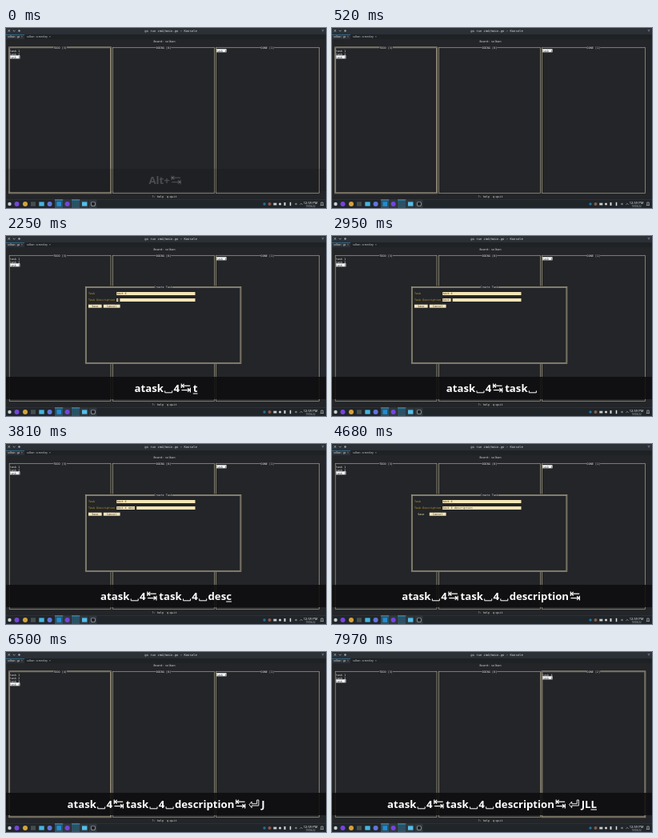
An HTML page with a canvas for the animation above (8 s loop, 400x225 px).

```html
<!DOCTYPE html>
<html lang="en">
<head>
<meta charset="utf-8">
<title>Kanban board in a terminal</title>
<style>
html, body { margin: 0; width: 100%; height: 100%; overflow: hidden; background: #232528; }
canvas { display: block; }
</style>
</head>
<body>
<canvas id="stage" width="400" height="225"></canvas>
<script>
const ctx = document.getElementById('stage').getContext('2d');
const LOOP = 8000, CHAR = 2.08;
const BG = '#232528', LIGHT = '#e2e3e3', CREAM = '#f6e5b5', GOLD = '#c59b25', TAN = '#ada38b';
const MONO = '3.455px "DejaVu Sans Mono", monospace';
const SANS = '"Noto Sans", "Open Sans", sans-serif';
const KEYFONT = 'bold 13.2px "Open Sans", "Noto Sans", sans-serif';

// Key presses: "_" is space, ">" is tab, "<" is enter.
const keys = 'atask_4>task_4_description><JLL';
const times = [523, 950, 1040, 1210, 1300, 1470, 1820, 2080, 2250, 2340, 2430, 2510, 2600,
  3040, 3210, 3470, 3550, 3640, 3730, 3900, 3980, 4070, 4160, 4240, 4330, 4420, 4510,
  4850, 5630, 7630, 7970];
const wide = { '_': 12.6, '>': 16.8, '<': 17 };

const rowY = r => 16 + 4 * r;

function box(x, y, w, h, color) {
  ctx.fillStyle = color;
  ctx.fillRect(x, y, w, h);
}

function dot(x, y, r, color) {
  ctx.fillStyle = color;
  ctx.beginPath();
  ctx.arc(x, y, r, 0, 7);
  ctx.fill();
}

function text(str, x, y, color = LIGHT, font = MONO, align = 'left') {
  ctx.font = font;
  ctx.fillStyle = color;
  ctx.textAlign = align;
  ctx.textBaseline = 'alphabetic';
  ctx.fillText(str, x, y);
}

const cell = (str, x, y, color) => text(str, x, y + 1.2, color);

function line(points, width = 1.2, color = '#fff') {
  ctx.strokeStyle = color;
  ctx.lineWidth = width;
  ctx.beginPath();
  points.forEach(([x, y], i) => i ? ctx.lineTo(x, y) : ctx.moveTo(x, y));
  ctx.stroke();
}

function frame(x, y, w, h, title, focused) {
  ctx.strokeStyle = TAN;
  ctx.lineWidth = 0.7;
  if (focused) {
    ctx.strokeRect(x - 0.5, y - 0.5, w + 1, h + 1);
    ctx.strokeRect(x + 0.5, y + 0.5, w - 1, h - 1);
  } else {
    ctx.strokeRect(x, y, w, h);
  }
  const tw = title.length * CHAR, tx = x + w / 2 - tw / 2;
  box(tx, y - 1.8, tw, 3.6, BG);
  cell(title, tx, y);
}

function column(x, w, name, items, selected, focused) {
  frame(x, 24.3, w, 182, `${name} [${items.length}]`, focused);
  items.forEach((n, i) => {
    const y = rowY(3 + i) + 0.3, on = i === selected, label = 'task ' + n;
    if (on) box(x + 0.7, y - 2, label.length * CHAR, 4, '#fff');
    cell(label, x + 0.7, y, on ? BG : LIGHT);
  });
}

function field(label, value, row, active) {
  const y = rowY(row), x = 138.2;
  cell(label, 103, y, GOLD);
  box(x, y - 2, 98.3, 4, CREAM);
  cell(value, x, y, '#3a3a36');
  if (active) box(x + value.length * CHAR, y - 2, CHAR, 4, BG);
}

function button(label, x, focused) {
  const y = rowY(18) - 0.3, w = (label.length + 4) * CHAR;
  box(x, y - 2, w, 4, focused ? BG : CREAM);
  cell(label, x + 2 * CHAR, y, focused ? CREAM : '#3a3a36');
}

function dialog(typed) {
  const [name, desc, save] = typed.slice(1).replace(/_/g, ' ').split('>');
  const onSave = save !== undefined, onDesc = desc !== undefined && !onSave;
  box(98.6, 62.4, 196, 97.6, BG);
  frame(99.8, 64, 193.6, 94.8, 'Create Task', true);
  field('Task', name, 14, !onDesc && !onSave);
  field('Task Description', desc || '', 16, onDesc);
  button('Save', 103, onSave);
  button('Cancel', 121.8, false);
}

function board(typed) {
  const open = typed && !typed.includes('<');
  const moves = typed.split('L').length - 1;
  const added = typed.includes('<');
  const todo = [1, 2, 3], doing = [], done = [4];
  if (added) [todo, doing, done][moves].push(4);
  const selected = !added || moves ? 2 : typed.includes('J') ? 3 : 0;
  const focus = open ? -1 : moves;
  text('Board: solban', 198, 17.5, LIGHT, MONO, 'center');
  column(4.2, 126.8, 'TODO', todo, selected, focus === 0);
  column(133.5, 127, 'DOING', doing, 0, focus === 1);
  column(262.4, 129, 'DONE', done, done.length - 1, focus === 2);
  text('?: help  q:quit', 198, 211.8, LIGHT, MONO, 'center');
  if (open) dialog(typed);
}

function windowBars() {
  box(0, 0, 400, 8, '#2b3037');
  text('go run cmd/main.go — Konsole', 206, 5.2, '#d4d7d9', '3.9px "DejaVu Sans Mono", monospace', 'center');
  line([[2.5, 2], [5, 4.8]], 0.6, '#c8cbcd');
  line([[5, 2], [2.5, 4.8]], 0.6, '#c8cbcd');
  line([[8.8, 2.8], [10.2, 4.3], [11.6, 2.8]], 0.6, '#c8cbcd');
  dot(16.5, 3.5, 1.2, '#a4aaad');
  for (const i of [0, 1, 2]) line([[394.5 + i * 0.6, 2.3 + i * 1.2], [397.6 - i * 0.6, 2.3 + i * 1.2]], 0.5, '#9ca2a6');
  box(0, 8, 400, 6, '#1f2225');
  box(0, 8, 23, 6, '#2b3037');
  box(0, 8, 23, 0.6, '#3b86ad');
  text('solban : go', 2, 12, '#e2e4e5', '3px ' + SANS);
  text('×', 19, 12, '#c8cbcd', '3px ' + SANS);
  text('solban : screenkey', 26, 12, '#c4c7c9', '3px ' + SANS);
  text('×', 54, 12, '#c8cbcd', '3px ' + SANS);
}

function taskbar() {
  box(0, 214, 400, 11, '#20252a');
  box(0, 214, 400, 0.5, '#343a3f');
  for (const x of [61, 82]) {
    box(x, 214.5, 10.4, 10.5, '#30505f');
    box(x, 214.5, 10.4, 0.8, '#3daee9');
  }
  for (const x of [71.5, 92.5, 103.5]) box(x, 214.5, 10, 10.5, '#2f373d');
  dot(4.5, 220, 2.2, '#c9d0d4');
  dot(13.5, 220, 3, '#7544dc');
  dot(24, 220, 3, '#d6a23c');
  box(31, 217.3, 6, 5.4, '#484d51');
  box(41.3, 217.4, 6.4, 5.2, '#44b7df');
  dot(54.6, 220, 3, '#6475dc');
  box(63.4, 217.2, 5.6, 5.6, '#248bd1');
  dot(76.6, 220, 3, '#7544dc');
  box(84.5, 217.3, 5.6, 5.4, '#27536a');
  box(95, 217.4, 6.4, 5.2, '#55bfe8');
  dot(109, 220, 3.1, '#a3a7a9');
  dot(109, 220, 2.4, '#202326');
  dot(323, 220, 1.7, '#246f9d');
  dot(329.5, 220, 2, '#8a5a4c');
  box(334.3, 218.7, 4, 2.8, '#c9cdd0');
  dot(342.5, 220, 1.5, '#d5d8da');
  box(347.5, 218, 2, 4, '#d5d8da');
  line([[355.5, 217.8], [355.5, 222.2]], 1.5, '#e0e3e4');
  dot(362.5, 220, 1.3, '#747b80');
  line([[367.5, 220.8], [369, 219.3], [370.5, 220.8]], 0.6, '#c9cdd0');
  text('12:59 PM', 380.5, 219.8, '#eceeef', '4.1px ' + SANS, 'center');
  text('19/03/22', 380.5, 223.6, '#b5babd', '2.9px ' + SANS, 'center');
  line([[393, 221.6], [393.8, 220.8], [393.8, 218], [396.2, 218], [396.2, 220.8], [397, 221.6], [393, 221.6]],
    0.6, '#d5d8da');
}

function glyph(key, x) {
  if (key === '_') {
    line([[x + 1.8, 193.4], [x + 1.8, 195.8], [x + 10.8, 195.8], [x + 10.8, 193.4]], 1);
  } else if (key === '>') {
    const arrow = (a, b, y, d) => {
      line([[a, y], [b, y]]);
      line([[a + d * 3.4, y - 2.3], [a + d * 0.8, y], [a + d * 3.4, y + 2.3]]);
      line([[a, y - 2.8], [a, y + 2.8]]);
    };
    arrow(x + 2.3, x + 13.2, 187.2, 1);
    arrow(x + 13.4, x + 2.5, 192.6, -1);
  } else if (key === '<') {
    line([[x + 11.5, 185], [x + 13.7, 185], [x + 13.7, 192], [x + 5, 192], [x + 5, 194.7],
      [x + 1.8, 190.8], [x + 5, 187], [x + 5, 189.7], [x + 11.5, 189.7], [x + 11.5, 185]], 0.9);
  } else {
    text(key, x, 195, '#fff', KEYFONT);
  }
}

function keyBar(shown, alpha, fresh) {
  ctx.font = KEYFONT;
  const widths = [...shown].map(k => wide[k] || ctx.measureText(k).width);
  let x = 200 - widths.reduce((a, b) => a + b, 0) / 2;
  ctx.globalAlpha = alpha;
  box(0, 176, 400, 28, 'rgba(14,14,15,.88)');
  [...shown].forEach((key, i) => {
    glyph(key, x);
    if (fresh && i === shown.length - 1) box(x, 196.5, widths[i], 1, '#fff');
    x += widths[i];
  });
  ctx.globalAlpha = 1;
}

function draw(t) {
  const count = times.filter(at => at <= t).length;
  const typed = keys.slice(0, count);
  box(0, 0, 400, 225, BG);
  windowBars();
  board(typed);
  taskbar();
  if (count) keyBar(typed, 1, t - times[count - 1] < 150);
  else if (t < 350) keyBar('Alt+>', 0.2 * (1 - t / 350), false);
}

function tick() {
  draw(performance.now() % LOOP);
  requestAnimationFrame(tick);
}
tick();
</script>
</body>
</html>
```
